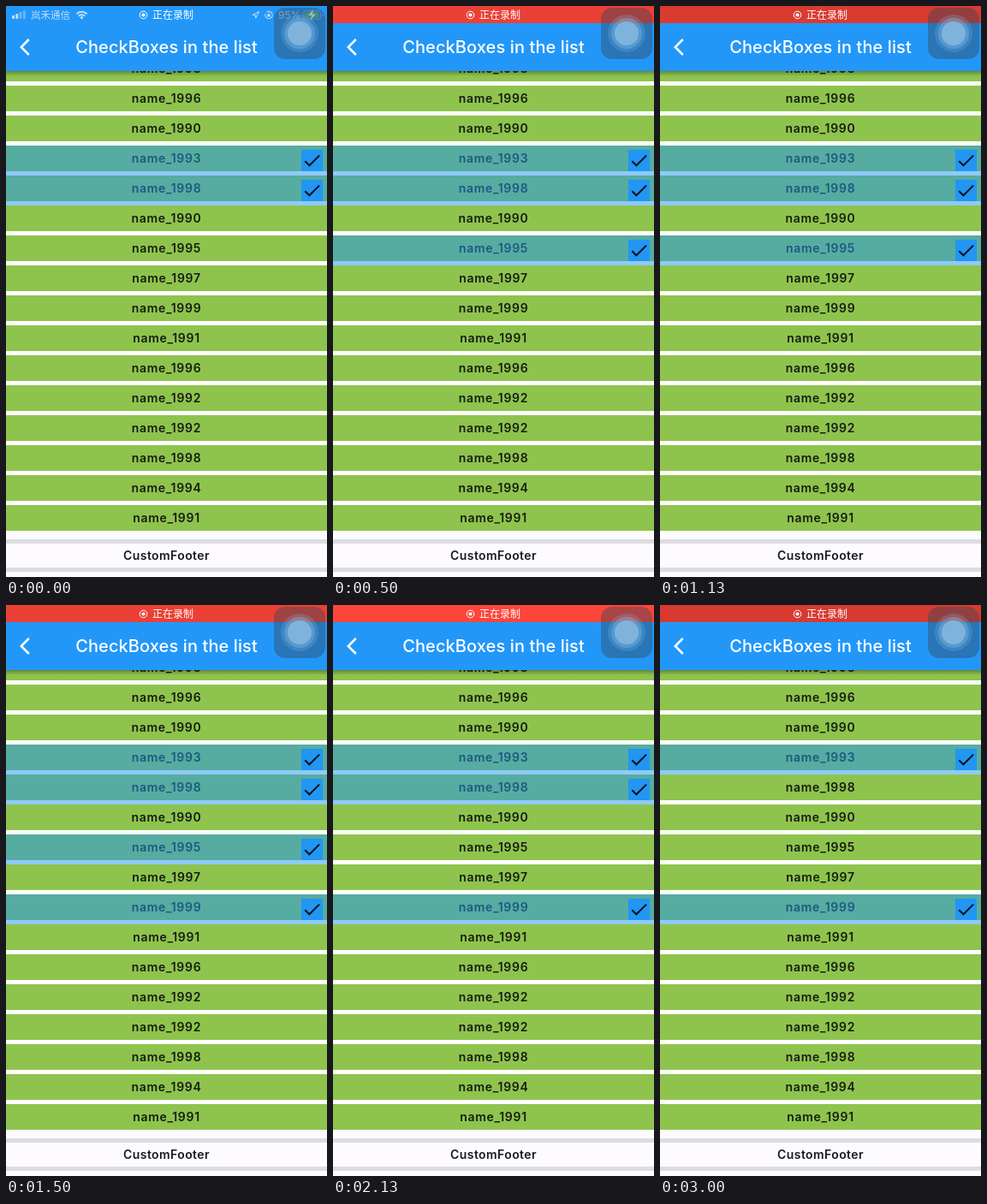
Write an HTML page with a canvas that moves like this. It is 375 by 667 pixels and loops after 3120 ms.

```html
<!DOCTYPE html>
<html lang="zh">
<head>
<meta charset="utf-8">
<title>CheckBoxes in the list</title>
<style>
html, body { margin: 0; width: 100%; height: 100%; overflow: hidden; background: #fff; }
canvas { display: block; }
</style>
</head>
<body>
<canvas id="stage" width="375" height="667"></canvas>
<script>
const ctx = document.getElementById('stage').getContext('2d');
const LOOP = 3120;
const BLUE = '#2397f8';
const LATIN = 'Inter, "Noto Sans", sans-serif';
const CJK = '"Noto Sans CJK SC", "Noto Sans CJK", sans-serif';
const years = [1998, 1996, 1990, 1993, 1998, 1990, 1995, 1997, 1999, 1991,
  1996, 1992, 1992, 1998, 1994, 1991];

// Row index -> [selected from, selected until] in ms
const selections = { 3: [0, LOOP], 4: [0, 2750], 6: [250, 1750], 8: [1250, LOOP] };
const RECORDING_START = 130;

function rect(color, x, y, w, h) {
  ctx.fillStyle = color;
  ctx.fillRect(x, y, w, h);
}

function text(str, x, y, font, color, align = 'left', spacing = 0) {
  ctx.font = font;
  ctx.fillStyle = color;
  ctx.textAlign = align;
  ctx.letterSpacing = spacing + 'px';
  ctx.fillText(str, x, y);
}

function line(points, color, width) {
  ctx.beginPath();
  points.forEach(([x, y]) => ctx.lineTo(x, y));
  ctx.strokeStyle = color;
  ctx.lineWidth = width;
  ctx.stroke();
}

function disc(color, x, y, r) {
  ctx.beginPath();
  ctx.arc(x, y, r, 0, Math.PI * 2);
  ctx.fillStyle = color;
  ctx.fill();
}

function arc(color, x, y, r, width, from = 0, to = Math.PI * 2) {
  ctx.beginPath();
  ctx.arc(x, y, r, from, to);
  ctx.strokeStyle = color;
  ctx.lineWidth = width;
  ctx.stroke();
}

function roundRect(color, x, y, w, h, r) {
  ctx.beginPath();
  ctx.roundRect(x, y, w, h, r);
  ctx.fillStyle = color;
  ctx.fill();
}

function drawRow(year, y, selected) {
  rect('#8ec44d', 0, y, 375, 30);
  text('name_' + year, 187.5, y + 20, '600 14px ' + LATIN, '#171b12', 'center', 0.7);
  if (!selected) return;
  rect('rgba(33,150,243,.5)', 0, y, 375, 35);
  rect('#2196f3', 345, y + 5, 25, 25);
  line([[349.3, y + 18.2], [354.4, y + 23.3], [366.1, y + 11.6]], '#0c1218', 2);
}

function drawFooter() {
  rect('#fdfbff', 0, 613, 375, 54);
  rect('#dddce0', 0, 623, 375, 5);
  rect('#dddce0', 0, 656, 375, 5);
  text('CustomFooter', 187.5, 647, '600 14px ' + LATIN, '#1b1b1d', 'center', 0.4);
}

function drawHeader() {
  const shadow = ctx.createLinearGradient(0, 76, 0, 82);
  shadow.addColorStop(0, 'rgba(0,0,0,.3)');
  shadow.addColorStop(1, 'rgba(0,0,0,0)');
  rect(shadow, 0, 76, 375, 6);
  rect(BLUE, 0, 0, 375, 76);
  line([[26.8, 39], [17.8, 48], [26.8, 57]], '#fff', 2.5);
  text('CheckBoxes in the list', 187.5, 55, '500 20px ' + LATIN, '#fff', 'center', 0.1);
}

function drawCarrierStatus() {
  const soft = 'rgba(255,255,255,.7)';
  for (let i = 0; i < 4; i++) {
    const h = 4 + i * 2;
    roundRect(i < 2 ? soft : 'rgba(255,255,255,.3)', 7 + i * 4.3, 15 - h, 3, h, 0.8);
  }
  text('岚禾通信', 29, 14.5, '11.5px ' + CJK, soft);
  for (const r of [4.8, 8.2]) arc(soft, 88.5, 15, r, 2.1, -Math.PI * .76, -Math.PI * .24);
  disc(soft, 88.5, 13.6, 1.6);

  line([[288, 10.5], [295.5, 6.5], [291.8, 14.2], [291.4, 10.8], [288, 10.5]], soft, 1);
  arc(soft, 307, 10.5, 4.2, 1.1, -2.2, 3.5);
  rect(soft, 305.3, 9.8, 3.4, 2.7);
  arc(soft, 307, 9.7, 1.1, 0.8, Math.PI, 0);
  text('95%', 318, 14.5, '12px ' + LATIN, soft);

  ctx.beginPath();
  ctx.roundRect(347.5, 5.5, 20, 10, 2.5);
  ctx.strokeStyle = 'rgba(255,255,255,.3)';
  ctx.lineWidth = 1;
  ctx.stroke();
  roundRect('rgba(76,217,100,.7)', 349, 7, 16.5, 7, 1.5);
  rect('rgba(255,255,255,.3)', 369, 9, 1.5, 3);
  ctx.beginPath();
  [[359, 4], [353, 11], [357, 11], [355.5, 17], [362, 9.5], [358, 9.5]]
    .forEach(([x, y]) => ctx.lineTo(x, y));
  ctx.fillStyle = '#fff';
  ctx.fill();
}

function drawStatus(t) {
  if (t < RECORDING_START) {
    drawCarrierStatus();
  } else {
    const glow = 0.922 + 0.078 * Math.cos(t * Math.PI / 1000);
    rect(`rgb(${[255, 69, 58].map(c => Math.round(c * glow))})`, 0, 0, 375, 20);
  }
  arc('#fff', 160.5, 10.5, 4.3, 1);
  disc('#fff', 160.5, 10.5, 2.1);
  text('正在录制', 171, 14.5, '12px ' + CJK, '#fff');
}

function drawTouchButton() {
  roundRect('rgba(50,70,88,.42)', 313, 2, 60, 60, 13);
  disc('rgba(130,190,235,.22)', 343, 32, 22);
  disc('rgba(140,195,235,.33)', 343, 32, 18);
  disc('#80b3dc', 343, 32, 14);
}

function draw() {
  const t = performance.now() % LOOP;
  rect('#fff', 0, 0, 375, 667);
  years.forEach((year, i) => {
    const [from, until] = selections[i] || [0, 0];
    drawRow(year, 58 + 35 * i, t >= from && t < until);
  });
  drawFooter();
  drawHeader();
  drawStatus(t);
  drawTouchButton();
  requestAnimationFrame(draw);
}
draw();
</script>
</body>
</html>
```
